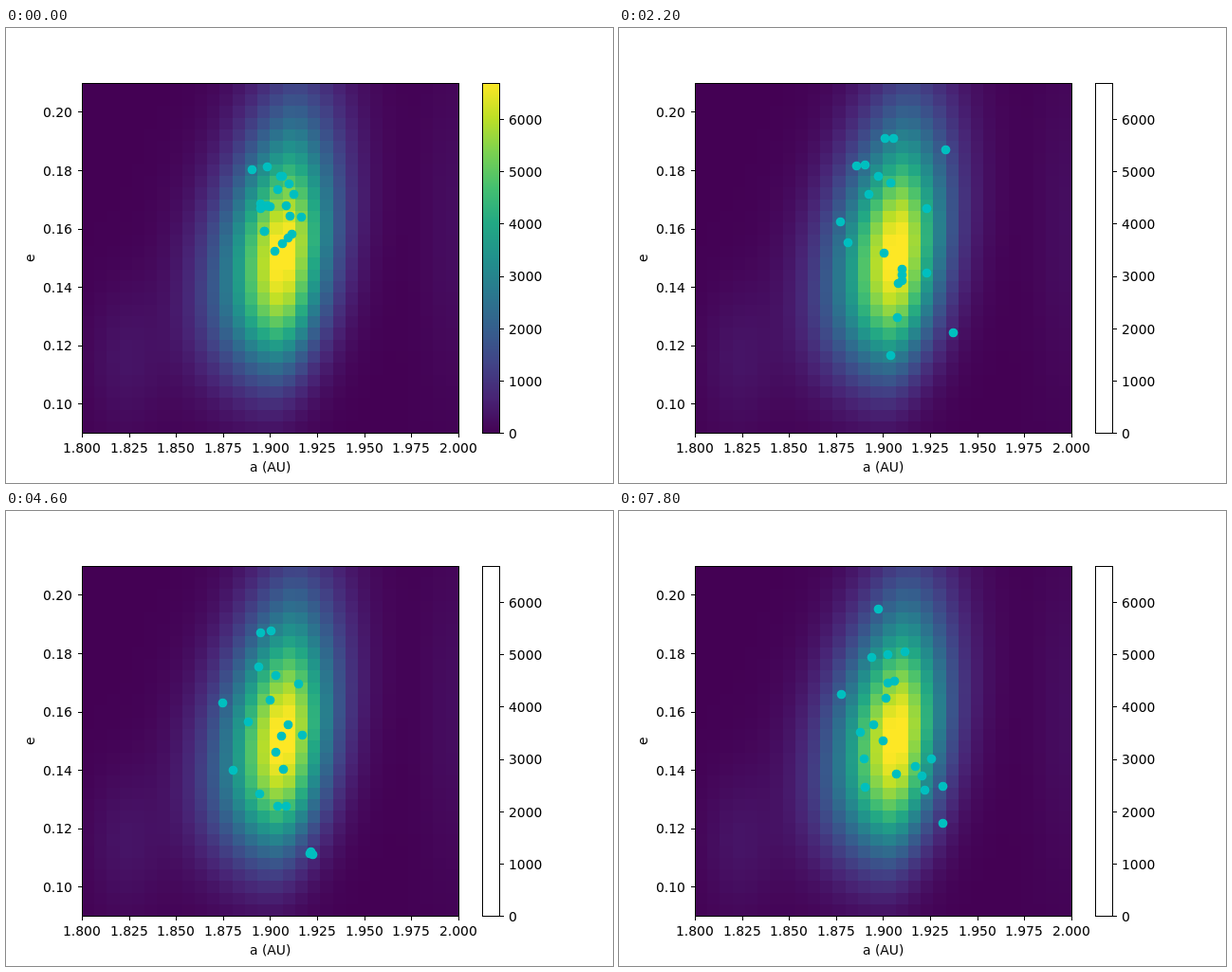
Animation of 640 by 480 pixels, one loop 8000 ms. Source, as an HTML page with a canvas:

```html
<!DOCTYPE html>
<html lang="en">
<head>
<meta charset="utf-8">
<title>Ensemble walkers over a density map</title>
<style>
  html, body { margin: 0; width: 100%; height: 100%; overflow: hidden; background: #fff; }
  canvas { display: block; }
</style>
</head>
<body>
<canvas id="stage" width="640" height="480"></canvas>
<script>
const stage = document.getElementById('stage').getContext('2d');
const STEP_MS = 200, STEPS = 40, BINS = 30, WALKERS = 20;
const plot = { left: 80, top: 57.6, width: 396.8, height: 369.6 };
const bar = { left: 501.6, top: 57.6, width: 18.48, height: 369.6 };
const viridis = ['440154', '482475', '414487', '355f8d', '2a788e', '21918c',
  '22a884', '44bf70', '7ad151', 'bddf26', 'fde725']
  .map(hex => [0, 2, 4].map(i => parseInt(hex.slice(i, i + 2), 16)));

function colour(value) {
  const p = Math.min(Math.max(value, 0), 0.9999) * (viridis.length - 1);
  const i = Math.floor(p);
  const rgb = viridis[i].map((c, k) => Math.round(c + (viridis[i + 1][k] - c) * (p - i)));
  return `rgb(${rgb})`;
}

const falloff = (d, scale, power) => Math.exp(-Math.pow(Math.abs(d) / scale, power));

// Tilted, lopsided peak with two faint patches beside it.
function density(x, y) {
  const dy = y - 232;
  const dx = x - (293 - dy * 0.07);
  const across = dx < 0 ? falloff(dx, 60 + dy * 0.05, 1.7) : falloff(dx, 47 - dy * 0.04, 1.75);
  const along = dy < 0 ? falloff(dy, 128, 1.7) : falloff(dy, 123, 2.5);
  return 1.04 * across * along +
    0.05 * falloff(x - 125, 38, 2) * falloff(y - 350, 75, 2) +
    0.035 * falloff(x - 470, 32, 2) * falloff(y - 210, 170, 2);
}

let seed = 918273645;
function random() {
  seed = (seed * 16807) % 2147483647;
  return seed / 2147483647;
}
const bell = () => (random() + random() + random() - 1.5) * 2;

// Stretch move: hop along the line through another walker, accepted by density.
function hop(walkers) {
  const next = walkers.slice();
  next.forEach((walker, i) => {
    const other = next[(i + 1 + Math.floor(random() * (WALKERS - 1))) % WALKERS];
    const z = (1 + random()) ** 2 / 2;
    const [x, y] = walker.map((v, k) => other[k] + z * (v - other[k]));
    const inside = x > 210 && x < 357 && y > 64 && y < 385;
    const accept = z * density(x, y) / density(...walker);
    if (random() < accept && inside) next[i] = [x, y];
  });
  return next;
}

// The walkers start in a tight cluster and spread over the peak.
const ensemble = [Array.from({ length: WALKERS }, () => [297 + 17 * bell(), 194 + 21 * bell()])];
while (ensemble.length < STEPS) ensemble.push(hop(ensemble[ensemble.length - 1]));

// Hairlines sit on whole pixels.
const snap = v => Math.floor(v + 0.5) + 0.5;

function line(ctx, x1, y1, x2, y2) {
  ctx.beginPath();
  ctx.moveTo(x1, y1);
  ctx.lineTo(x2, y2);
  ctx.stroke();
}

function frame(ctx, box) {
  const x = snap(box.left), y = snap(box.top);
  ctx.strokeRect(x, y, snap(box.left + box.width) - x, snap(box.top + box.height) - y);
}

// Places text on whole pixels; anchor is 0 for left, 0.5 for centre, 1 for right.
function label(ctx, text, x, baseline, anchor) {
  ctx.fillText(text, Math.round(x - anchor * ctx.measureText(text).width), Math.ceil(baseline));
}

function drawHeatmap(ctx) {
  const w = plot.width / BINS, h = plot.height / BINS;
  for (let row = 0; row < BINS; row++) {
    for (let col = 0; col < BINS; col++) {
      const x = plot.left + col * w, y = plot.top + row * h;
      const px = Math.round(x), py = Math.round(y);
      ctx.fillStyle = colour(density(x + w / 2, y + h / 2));
      ctx.fillRect(px, py, Math.round(x + w) - px, Math.round(y + h) - py);
    }
  }
}

function drawAxes(ctx) {
  const bottom = plot.top + plot.height, right = bar.left + bar.width;
  ctx.strokeStyle = ctx.fillStyle = '#000';
  ctx.lineWidth = 1;
  ctx.font = '13.89px "DejaVu Sans", sans-serif';
  frame(ctx, plot);
  frame(ctx, bar);
  for (let i = 0; i <= 8; i++) {
    const x = plot.left + i * plot.width / 8;
    line(ctx, snap(x), 427, snap(x), 432);
    label(ctx, (1.8 + i * 0.025).toFixed(3), x, 448, 0.5);
  }
  for (let i = 0; i <= 5; i++) {
    const y = 396.4 - i * 61.6;
    line(ctx, 76, snap(y), 80, snap(y));
    label(ctx, (0.1 + i * 0.02).toFixed(2), 70.3, y + 5.2, 1);
  }
  for (let i = 0; i <= 6; i++) {
    const y = bottom - i * 55.2;
    line(ctx, 520, snap(y), 525, snap(y));
    label(ctx, String(i * 1000), right + 9.7, y + 5.2, 0);
  }
  label(ctx, 'a (AU)', 278.4, 468, 0.5);
  ctx.save();
  ctx.translate(30, 243);
  ctx.rotate(-Math.PI / 2);
  label(ctx, 'e', 0, 0, 0.5);
  ctx.restore();
}

function makeBackdrop(filledBar) {
  const canvas = document.createElement('canvas');
  canvas.width = 640;
  canvas.height = 480;
  const ctx = canvas.getContext('2d');
  ctx.fillStyle = '#fff';
  ctx.fillRect(0, 0, 640, 480);
  drawHeatmap(ctx);
  if (filledBar) {
    for (let y = 58; y < 427; y++) {
      ctx.fillStyle = colour((427 - y) / bar.height);
      ctx.fillRect(502, y, 18, 1);
    }
  }
  drawAxes(ctx);
  return canvas;
}

const firstBackdrop = makeBackdrop(true);
const backdrop = makeBackdrop(false);

function render() {
  const step = Math.floor(performance.now() / STEP_MS) % STEPS;
  stage.drawImage(step === 0 ? firstBackdrop : backdrop, 0, 0);
  stage.fillStyle = '#00bfbf';
  for (const [x, y] of ensemble[step]) {
    stage.beginPath();
    stage.arc(Math.round(x) + 0.5, Math.round(y) + 0.5, 4.86, 0, Math.PI * 2);
    stage.fill();
  }
  requestAnimationFrame(render);
}
render();
</script>
</body>
</html>
```
